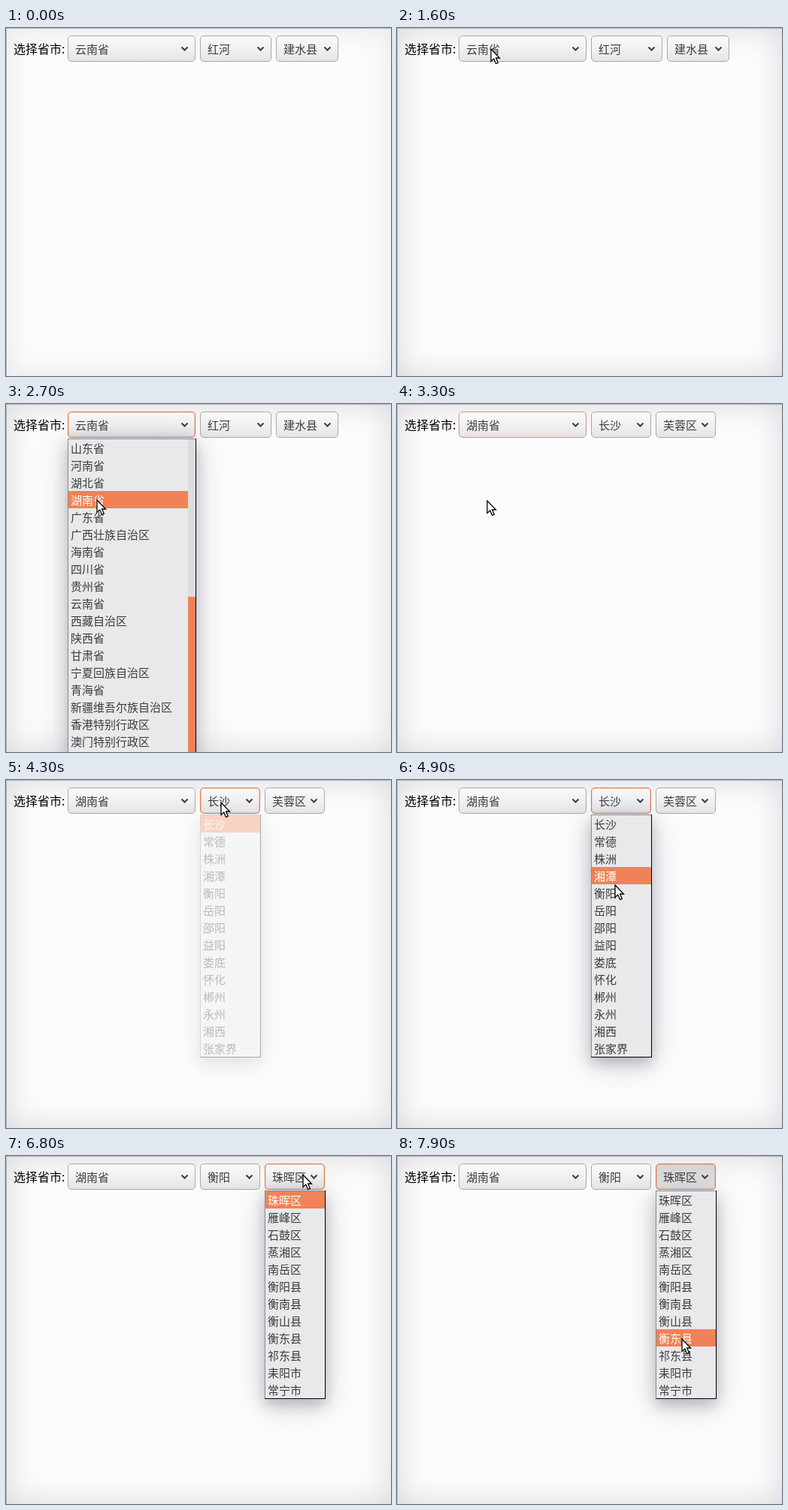
An HTML page that plays this animation: 512x464 px, repeating every 8000 ms.

```html
<!DOCTYPE html>
<html lang="zh-CN">
<head>
<meta charset="utf-8">
<style>
  html, body { margin: 0; width: 100%; height: 100%; overflow: hidden; }
  body { position: relative; background: #fcfcfc; color: #3c3c3c;
         font: 15px/23px "Noto Sans CJK SC", "Noto Sans CJK", sans-serif; }
  div, svg { position: absolute; box-sizing: border-box; white-space: nowrap; }
  #edge { inset: 0; border: solid #b4b4b4; border-width: 1px 0 0 1px; }
  #label { left: 10px; top: 10px; font-size: 16px; line-height: 35px; color: #000; }
  .select { top: 10px; height: 35px; padding-left: 9px; line-height: 33px;
            border: 1px solid #a9a9ac; border-radius: 5px;
            background: linear-gradient(#fafafb, #f1f1f2 50%, #e4e4e6); }
  .select.focus { border-color: #c49a7c; }
  .select.open { border-color: #dd7748; box-shadow: inset 0 0 2px #e99a70; }
  .select.pressed { background: linear-gradient(#d6d6d8, #e2e2e4); }
  .select svg { right: 8px; top: 13px; }
  .list { top: 46px; overflow: hidden; background: #e9e8ea; padding-top: 1px;
          border: solid #000; border-width: 0 1px 1px 0;
          box-shadow: inset 1px 1px #8c8c8c, 0 8px 16px rgba(90,90,105,.3), 0 8px 40px rgba(120,120,145,.35); }
  .row { position: static; height: 23px; margin-left: 1px; padding-left: 3px; }
  .row.on { background: #f08257; color: #fff; }
  .long .row { margin-right: 10px; }
  .track { left: 160px; top: 1px; width: 10px; height: 500px; background: #dddde0; }
  .thumb { left: 160px; top: 211px; width: 10px; height: 300px; background: #ee8158; }
</style>
</head>
<body>
<div id="edge"></div>
<div id="label">选择省市:</div>
<svg id="cursor" width="16" height="23" style="left:0;top:-1px">
  <path d="M1 1V17.5L4.8 14L7.5 20.5L10.3 19.3L7.6 13H12.5Z" fill="#fff" stroke="#000" stroke-width="1.3"/>
</svg>
<script>
const provinces = '山东省 河南省 湖北省 湖南省 广东省 广西壮族自治区 海南省 四川省 贵州省 云南省 西藏自治区 陕西省 甘肃省 宁夏回族自治区 青海省 新疆维吾尔族自治区 香港特别行政区 澳门特别行政区 台湾省';
const cities = '长沙 常德 株洲 湘潭 衡阳 岳阳 邵阳 益阳 娄底 怀化 郴州 永州 湘西 张家界';
const districts = '珠晖区 雁峰区 石鼓区 蒸湘区 南岳区 衡阳县 衡南县 衡山县 衡东县 祁东县 耒阳市 常宁市';

// Values and [left, width] of the three selects, from each time on
const wide = [[82, 170], [258, 95], [359, 83]];
const narrow = [[82, 170], [258, 80], [344, 80]];
const states = [
  { from: 0, text: ['云南省', '红河', '建水县'], box: wide },
  { from: 3200, text: ['湖南省', '长沙', '芙蓉区'], box: narrow },
  { from: 5300, text: ['湖南省', '衡阳', '珠晖区'], box: narrow }
];
const menus = [
  { open: 2000, close: 3200, names: provinces, row: 9 },
  { open: 4300, close: 5300, names: cities, row: 0 },
  { open: 6600, close: 8000, names: districts, row: 0 }
];
// Pointer: time, x, y
const path = [
  [100, 500, 220], [400, 415, 58], [500, 415, 58], [1600, 124, 28], [2000, 124, 28],
  [2700, 120, 128], [2900, 119, 129], [3300, 119, 129], [4000, 285, 30], [4300, 285, 30],
  [4900, 289, 140], [5100, 290, 150], [5300, 290, 150], [5900, 390, 44], [6300, 394, 25],
  [7100, 394, 25], [7600, 378, 244]
];

const cursor = document.getElementById('cursor');
const edge = document.getElementById('edge');

function add(parent, cls, html = '') {
  const el = document.createElement('div');
  el.className = cls;
  el.innerHTML = html;
  parent.appendChild(el);
  return el;
}

const chevron = '<svg width="11" height="8"><path d="M1.5 1.5L5.5 5.5L9.5 1.5" fill="none" stroke="#3c3c3c" stroke-width="2"/></svg>';
const selects = menus.map(() => {
  const el = add(document.body, 'select', '<span></span>' + chevron);
  return { el, text: el.firstChild };
});

menus.forEach((m, i) => {
  m.el = add(document.body, i ? 'list' : 'list long');
  m.el.style.left = narrow[i][0] + 'px';
  m.el.style.width = narrow[i][1] + 1 + 'px';
  m.rows = m.names.split(' ').map(name => add(m.el, 'row', name));
  if (!i) {
    add(m.el, 'track');
    add(m.el, 'thumb');
  }
});
document.body.appendChild(cursor);

function pointer(t) {
  const n = path.findIndex(p => p[0] > t);
  if (n < 0) return path[path.length - 1].slice(1);
  if (n === 0) return path[0].slice(1);
  const [t0, x0, y0] = path[n - 1], [t1, x1, y1] = path[n];
  const u = (t - t0) / (t1 - t0);
  const k = u * u * (3 - 2 * u);
  return [x0 + (x1 - x0) * k, y0 + (y1 - y0) * k];
}

function draw(t) {
  const state = states.filter(s => s.from <= t).pop();
  const focus = menus.filter(m => m.open <= t).length - 1;
  const hoverY = pointer(t - 100)[1]; // the highlight trails the pointer by one step

  menus.forEach((m, i) => {
    const open = t >= m.open && t < m.close;
    const { el, text } = selects[i];
    const [left, width] = state.box[i];
    text.textContent = state.text[i];
    el.style.left = left + 'px';
    el.style.width = width + 'px';
    el.classList.toggle('focus', i === focus);
    el.classList.toggle('open', open);
    el.classList.toggle('pressed', i === 2 && t >= 7900);
    m.el.style.display = open ? 'block' : 'none';
    m.el.style.opacity = Math.min(1, (t - m.open + 100) / 300);
    const on = hoverY < 47 ? m.row : Math.floor((hoverY - 47) / 23);
    m.rows.forEach((row, j) => row.classList.toggle('on', j === on));
  });

  const glow = 0.2 + 0.15 * Math.min(t / 400, 1);
  edge.style.boxShadow = `inset 0 0 40px rgba(150,150,165,${glow})`;
  const [x, y] = pointer(t);
  cursor.style.display = t < 100 ? 'none' : 'block';
  cursor.style.transform = `translate(${Math.round(x)}px, ${Math.round(y)}px)`;
}

const start = performance.now();
function frame() {
  const t = (performance.now() - start) % 8000;
  draw(Math.floor(t / 100) * 100);
  requestAnimationFrame(frame);
}
frame();
</script>
</body>
</html>
```
